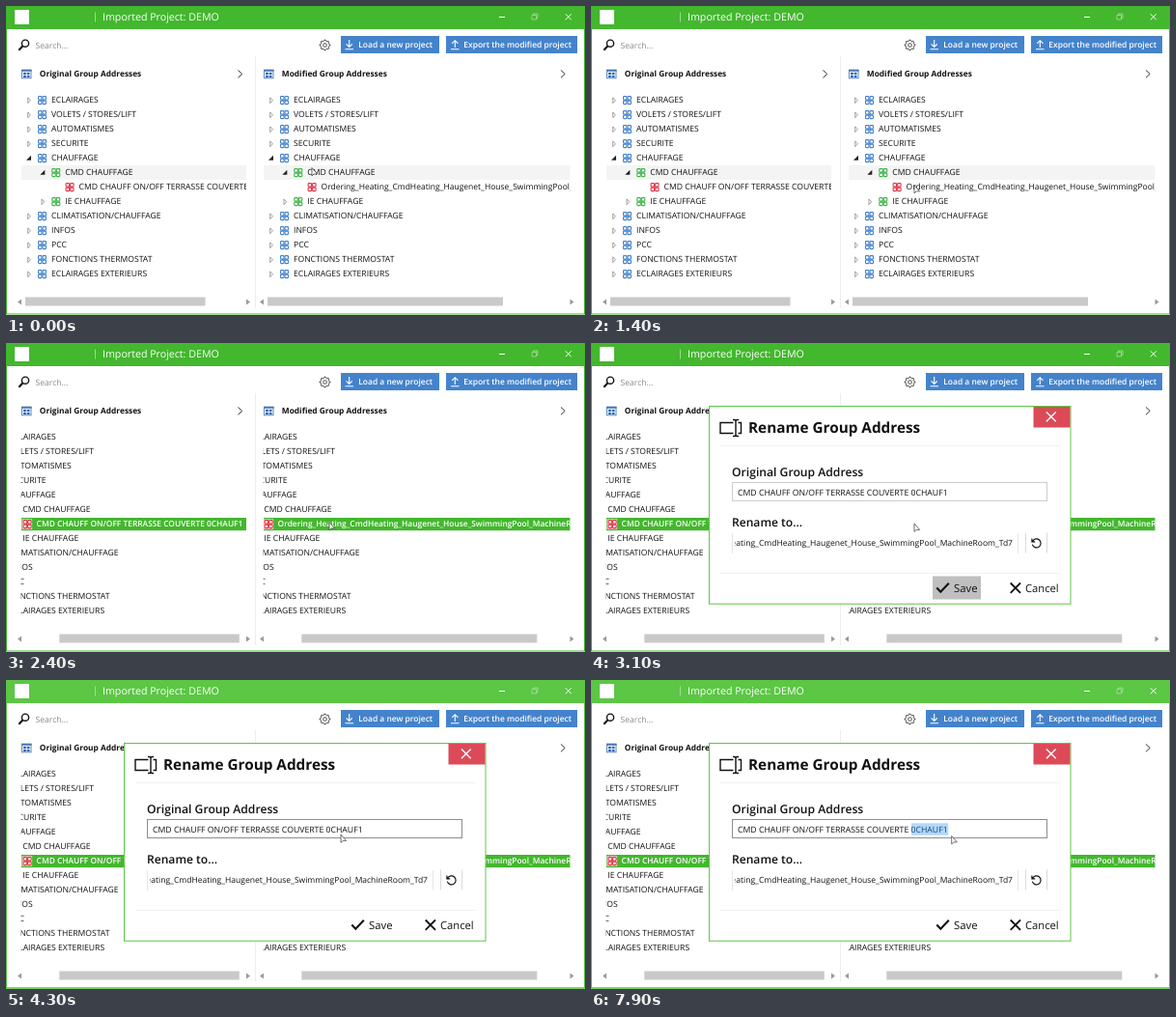
An HTML page that plays this animation: 600x320 px, repeating every 8 s.

```html
<!DOCTYPE html>
<html lang="fr">
<head>
<meta charset="utf-8">
<title>Rename Group Address</title>
<style>
html, body { margin: 0; width: 100%; height: 100%; overflow: hidden; background: #fff; }
svg { display: block; width: 600px; height: 320px; }
text { font-family: "Open Sans", "Noto Sans", sans-serif; text-rendering: geometricPrecision; white-space: pre; }
.picked .leaf { fill: #fff; font-weight: 600; font-size: 8.4px; }
</style>
</head>
<body>
<svg id="stage" viewBox="0 0 600 320" xmlns="http://www.w3.org/2000/svg"></svg>
<script>
const GREEN = '#43b72e', PALE_GREEN = '#5cc645', BLUE = '#4483cb', RED = '#e5384a', INK = '#111';
const LOOP = 8000, STEP = 100;
const T = { scroll: 1800, select: 1900, dialog: 3100, hover: 4300, beam: 4400, word: 5400, arrow: 7900 };

const rect = (x, y, w, h, fill, more = '') =>
  `<rect x="${x}" y="${y}" width="${w}" height="${h}" fill="${fill}" ${more}/>`;
const line = (d, color = INK, w = 1, more = '') =>
  `<path d="${d}" fill="none" stroke="${color}" stroke-width="${w}" ${more}/>`;
const shape = (d, fill) => `<path d="${d}" fill="${fill}"/>`;
const text = (x, y, s, size = 8.6, fill = INK, weight = 400, more = '') =>
  `<text x="${x}" y="${y}" font-size="${size}" fill="${fill}" font-weight="${weight}" ${more}>${s}</text>`;
const group = (id, body, more = '') => `<g id="${id}" ${more}>${body}</g>`;

// Four linked cells, the mark of a group address
function cells(x, y, color) {
  let s = '';
  for (const dx of [0.5, 5]) for (const dy of [0.5, 5])
    s += rect(x + dx, y + dy, 3.5, 3.5, '#fff', `rx=".8" stroke="${color}" stroke-width="1.1"`);
  return s + line(`M${x + 3.6} ${y + 3.6}l1.8 1.8m0 -1.8l-1.8 1.8`, color, 0.9);
}

const FULL = 'CMD CHAUFF ON/OFF TERRASSE COUVERTE 0CHAUF1';
const RENAMED = 'Ordering_Heating_CmdHeating_Haugenet_House_SwimmingPool_MachineRoom_Td7';
// level, open (1), closed (0) or leaf (2), label
const ROWS = [
  [0, 0, 'ECLAIRAGES'], [0, 0, 'VOLETS / STORES/LIFT'], [0, 0, 'AUTOMATISMES'],
  [0, 0, 'SECURITE'], [0, 1, 'CHAUFFAGE'], [1, 1, 'CMD CHAUFFAGE'], [2, 2, ''],
  [1, 0, 'IE CHAUFFAGE'], [0, 0, 'CLIMATISATION/CHAUFFAGE'], [0, 0, 'INFOS'],
  [0, 0, 'PCC'], [0, 0, 'FONCTIONS THERMOSTAT'], [0, 0, 'ECLAIRAGES EXTERIEURS']
];

function tree(id, dx, leaf) {
  return ROWS.map(([level, open, label], i) => {
    const y = 97.3 + i * 15, x = dx + level * 14.3;
    const toggle = open === 1 ? shape(`M${x + 26} ${y - 2.5}v5h-5z`, '#222')
      : open === 0 ? line(`M${x + 22.7} ${y - 2.4}l2.7 2.9l-2.7 2.9z`, '#888', 0.8) : '';
    const isLeaf = level === 2;
    const back = isLeaf ? group(id + 'Back', rect(x + 32, y - 5, 10.5, 10.5, '#f8d3d6')) : '';
    return toggle + back + cells(x + 33, y - 4.2, [BLUE, '#3fb549', RED][level]) +
      text(x + 47, y + 3, label || leaf, isLeaf && dx ? 8.5 : 8.6, INK, 400, isLeaf ? 'class="leaf"' : '');
  }).join('');
}

function windowIcon(x, y) {
  let s = rect(x + .5, y + .5, 9.5, 8.5, '#fff', 'stroke="#5f87b5"') + rect(x, y, 10.5, 2, '#4a78b0');
  for (const dx of [2, 5.7]) for (const dy of [3, 6]) s += rect(x + dx, y + dy, 2.8, 2.2, '#2867b8');
  return s;
}

function panel(id, o) {
  const bar = (y, h, fill) => rect(o.left + 7, y, o.right - o.left - 7, h, fill);
  return windowIcon(o.head, 65.8) +
    text(o.head + 18.8, 73, o.title, 8.35, INK, 700) +
    line(`M${o.chev} 66.5l4.2 3.9l-4.2 3.9`, '#333', 1) +
    group(id + 'Pale', bar(165, 15, '#f4f4f4')) +
    group(id + 'Sel', bar(181, 13.2, GREEN)) +
    `<clipPath id="${id}Clip">${rect(o.left + 6.6, 85, o.right - o.left - 6.6, 205, '#000')}</clipPath>` +
    `<g clip-path="url(#${id}Clip)">${group(id + 'Tree', tree(id, o.dx, o.leaf))}</g>` +
    shape(`M${o.left + 7} 303.5v6l-4 -3z`, '#999') +
    shape(`M${o.right} 303.5v6l4 -3z`, '#999') +
    group(id + 'Thumb', rect(o.thumb, 301.5, o.length, 9, '#c9c9c9'));
}

function gear(x, y) {
  let d = '';
  for (let i = 0; i < 32; i++) {
    const a = (i - .5) * Math.PI / 16, r = i % 4 < 2 ? 5.4 : 4.2;
    d += `${i ? 'L' : 'M'}${(x + r * Math.cos(a)).toFixed(2)} ${(y + r * Math.sin(a)).toFixed(2)}`;
  }
  return line(d + 'z', '#333', 0.9) + `<circle cx="${x}" cy="${y}" r="1.8" fill="none" stroke="#333" stroke-width=".9"/>`;
}

const chrome = color =>
  rect(0.5, 0.5, 599, 318.5, 'none', `stroke="${color}"`) + rect(0, 0, 600, 24, color);

const frame =
  rect(0, 0, 600, 320, '#fff') +
  chrome(GREEN) + group('inactive', chrome(PALE_GREEN)) +
  rect(9, 4, 15, 15, '#fff') +
  line('M92.5 6.5v10', '#b5e3aa', 0.8) +
  text(100, 15.3, 'Imported Project: DEMO', 10.65, '#fff') +
  line('M511 11.5h6', '#fff') +
  line('M545 9.5h4.5v4.5h-4.5zM546.5 9.5v-1.5h4.5v4.5h-1.5', '#a9dfa0', 0.8) +
  line('M579.8 8.3l6 6m0 -6l-6 6', '#fff') +
  `<circle cx="20" cy="38.7" r="3.6" fill="none" stroke="${INK}" stroke-width="1.4"/>` +
  line('M17.3 41.5l-4 4.3', INK, 2) +
  text(30.5, 43.7, 'Search...', 8.6, '#8a8a8a') +
  gear(330.5, 40.5) +
  rect(347, 31, 102, 18, BLUE) + rect(456, 31, 136, 18, BLUE) +
  line('M355.7 35v7.2M352.6 39.4l3.1 3.1l3.1 -3.1M351.5 44.7h8.5', '#fff', 1.1) +
  line('M465.3 43v-7.2M462.2 38.8l3.1 -3.1l3.1 3.1M461 44.7h8.5', '#fff', 1.1) +
  text(365.3, 43.3, 'Load a new project', 8.45, '#fff', 600) +
  text(474.3, 43.3, 'Export the modified project', 8.45, '#fff', 600) +
  line('M258.5 52V313', '#ededed');

const dialog =
  rect(122.5, 65.5, 374.5, 204.7, '#fff', `stroke="${PALE_GREEN}"`) +
  rect(458.5, 66, 38, 21.5, '#dc4a58') +
  line('M471.9 71.4l9.8 9.8m0 -9.8l-9.8 9.8', '#fff', 1.4) +
  line('M147.5 82.5h-13.5v11h13.5M152.5 82.5h3v11h-3M147 79.5h1.5q1.5 0 1.5 1.5v14q0 1.5 -1.5 1.5h-1.5M153 79.5h-1.5q-1.5 0 -1.5 1.5v14q0 1.5 1.5 1.5h1.5', INK, 1.4) +
  text(163, 93.2, 'Rename Group Address', 15.3, INK, 700) +
  line('M134 106.5H487M134 238.5H487', '#f1f1f1') +
  text(146, 137.6, 'Original Group Address', 12.15, INK, 600) +
  `<rect id="field" x="146.5" y="144.5" width="326" height="19" fill="#fff"/>` +
  text(152, 157.6, FULL, 8.7) +
  group('word', rect(332, 148.3, 38.3, 12.4, '#39f'), 'opacity=".38"') +
  text(146, 190.2, 'Rename to...', 12.1, INK, 600) +
  line('M146.5 197v21M442.5 197v21', '#e6e6e6') +
  `<clipPath id="inputClip">${rect(149.3, 198, 290, 19, '#000')}</clipPath>` +
  `<g clip-path="url(#inputClip)">${text(437, 210, RENAMED, 8.52, INK, 400, 'text-anchor="end"')}</g>` +
  line('M450.5 196.5v21M472.5 196.5v21', '#dadada') +
  line('M457.6 205.3a4.5 4.5 0 1 1 -.3 3.4M456.9 202.6v3.2h3.3', INK, 1.15) +
  group('press', rect(354, 241.5, 50, 24, '#bfbfbf')) +
  line('M358.3 253.5l4 4.2l8.5 -9', INK, 2.1) +
  text(376, 257.5, 'Save', 11.3) +
  line('M434.7 248.5l10.3 10.3m0 -10.3l-10.3 10.3', INK, 1.8) +
  text(450, 257.5, 'Cancel', 11.2);

const pointer = '<path d="M0 -.5V7.9L2.2 5.9H5.6Z" fill="#fff" stroke="#4a4a4a" stroke-width=".8"/>';
const beam = line('M0 -4v8', '#667', 0.7, 'opacity=".6"');

document.getElementById('stage').innerHTML = frame +
  panel('a', { left: 9, right: 249, head: 16, chev: 240.5, dx: 0, title: 'Original Group Addresses', leaf: FULL, thumb: 20, length: 186.5 }) +
  panel('b', { left: 260, right: 584.5, head: 267, chev: 575, dx: 251, title: 'Modified Group Addresses', leaf: RENAMED, thumb: 271, length: 244 }) +
  group('dialog', dialog) + group('pointer', pointer) + group('beam', beam);

const el = id => document.getElementById(id);
const show = (id, on) => el(id).setAttribute('visibility', on ? 'inherit' : 'hidden');
const move = (id, x, y) => el(id).setAttribute('transform', `translate(${x} ${y})`);
const fade = (id, k) => el(id).setAttribute('opacity', k);

// time, x, y of the mouse
const PATH = [
  [0, 317, 168], [100, 317, 168], [900, 333, 184], [1200, 335, 186], [3000, 335, 186],
  [3100, 335, 187.5], [4100, 335, 187.5], [4300, 347, 160.5], [4400, 350, 156],
  [4600, 353, 154.7], [7700, 353, 154.7], [7800, 361, 156], [7900, 373.7, 162], [8000, 373.7, 162]
];

function mouseAt(t) {
  const i = Math.max(1, PATH.findIndex(p => p[0] >= t));
  const [t0, x0, y0] = PATH[i - 1], [t1, x1, y1] = PATH[i];
  const k = (t - t0) / (t1 - t0);
  return [x0 + (x1 - x0) * k, y0 + (y1 - y0) * k];
}

function draw(now) {
  const t = Math.floor(now % LOOP / STEP) * STEP;
  const scrolled = t >= T.scroll, selected = t >= T.select;
  for (const [id, shift] of [['a', 44], ['b', 45]]) {
    move(id + 'Tree', scrolled ? -shift : 0, 0);
    move(id + 'Thumb', scrolled ? 35.3 : 0, 0);
    show(id + 'Pale', !selected);
    show(id + 'Sel', selected);
    show(id + 'Back', selected);
  }
  el('stage').classList.toggle('picked', selected);

  const opened = Math.max(0, Math.min(1, (t - T.dialog) / 200));
  show('dialog', t >= T.dialog);
  fade('inactive', opened);
  fade('press', 1 - opened);
  el('field').setAttribute('stroke', t >= T.hover ? '#8e8e8e' : '#cdcdcd');
  show('word', t >= T.word);

  const [x, y] = mouseAt(t), typing = t >= T.beam && t < T.arrow;
  move('pointer', x, y);
  move('beam', x, y);
  show('pointer', !typing);
  show('beam', typing);
}

function tick() {
  draw(performance.now());
  requestAnimationFrame(tick);
}
tick();
</script>
</body>
</html>
```
